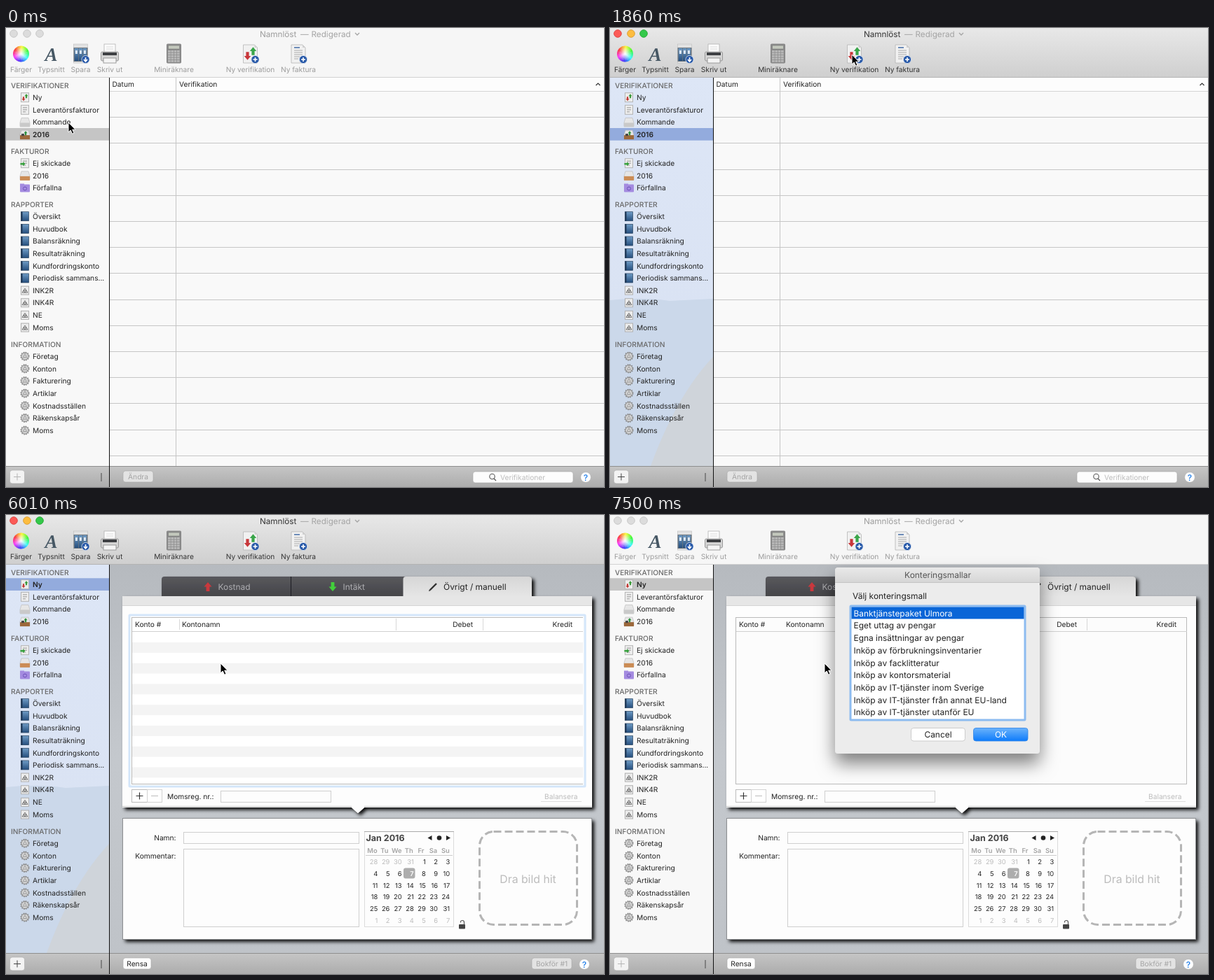
Recreate the animation shown at these times as an HTML page. Size 853 by 656 pixels, loop 8 s.

```html
<!DOCTYPE html>
<html lang="sv">
<head>
<meta charset="utf-8">
<title>Bokföring</title>
<style>
html, body { margin: 0; width: 100%; height: 100%; overflow: hidden; background: #f6f6f6 }
svg { display: block; width: 853px; height: 656px }
text { font: 10.2px Inter, "Open Sans", sans-serif; text-rendering: geometricPrecision; fill: #222; white-space: pre }
.big { font-size: 11.95px }
.title { font-size: 11.7px }
.head { font-weight: 500; fill: #686868 }
.chrome { fill: #9c9c9c }
.on .chrome { fill: #333 }
.dim { fill: #a4a4a4 }
.pale { fill: #bcbcbc }
.bar { fill: #f6f6f6 }
.on .bar { fill: url(#bar) }
.edge { fill: #d2d2d2 }
.on .edge { fill: #b3b3b3 }
.light { fill: #dcdcdc; stroke: #c8c8c8 }
.on .light { fill: var(--c); stroke: var(--s) }
.sel { fill: #c5c5c5 }
.on .sel { fill: #93abdd }
.year, .form .new { font-weight: 600 }
.form .year { font-weight: 400 }
.tint, .panel, .focus, .dialog { display: none }
.on .tint, .form .panel, .ring .focus, .ask .dialog { display: inline }
.form .list { display: none }
.plus { stroke: #b5b5b5 }
.on .plus { stroke: #444 }
</style>
</head>
<body>
<script>
const rect = (x, y, w, h, fill, more = '') =>
  `<rect x="${x}" y="${y}" width="${w}" height="${h}" fill="${fill}" ${more}/>`;
const box = (x, y, w, h, fill, stroke, r = 0) => rect(x, y, w, h, fill, `stroke="${stroke}" rx="${r}"`);
const path = (d, fill, more = '') => `<path d="${d}" fill="${fill}" ${more}/>`;
const line = (d, color, w = 1, more = '') => path(d, 'none', `stroke="${color}" stroke-width="${w}" ${more}`);
const dot = (x, y, r, fill, more = '') => `<circle cx="${x}" cy="${y}" r="${r}" fill="${fill}" ${more}/>`;
const text = (x, y, s, cls = '', more = '') => `<text x="${x}" y="${y}" class="${cls}" ${more}>${s}</text>`;
const mid = 'text-anchor="middle"', end = 'text-anchor="end"';
const at = (x, y, body, s = 1) => `<g transform="translate(${x} ${y}) scale(${s})">${body}</g>`;
const group = (cls, body) => `<g class="${cls}">${body}</g>`;
const each = (n, f) => Array.from({ length: n }, (_, i) => f(i)).join('');
const fade = (id, ...stops) => `<linearGradient id="${id}" x2="0" y2="1">` +
  stops.map((c, i) => `<stop offset="${i / (stops.length - 1)}" stop-color="${c}"/>`).join('') + '</linearGradient>';
const shadow = (id, dx, dy, blur, a) => `<filter id="${id}" x="-20%" y="-30%" width="140%" height="160%">` +
  `<feDropShadow dx="${dx}" dy="${dy}" stdDeviation="${blur}" flood-opacity="${a}"/></filter>`;

const defs = `<defs>${fade('bar', '#e8e8e8', '#cfcfcf')}${fade('foot', '#c6c6c6', '#acacac')}
${fade('desk', '#b6babf', '#c4c8cd', '#bfc3c8')}${fade('side', '#dde6f6', '#d8e1f2')}${fade('tab', '#58585c', '#454549')}
${fade('strip', '#d6d6d6', '#e6e6e6')}${fade('ok', '#6bb3fb', '#0d7bfb')}${fade('book', '#6f9cc6', '#254e7d')}
${fade('cap', '#e9e9e9', '#d6d6d6')}${shadow('lift', 3.5, 3.5, 2.5, .95)}${shadow('float', 0, 14, 13, .5)}
<radialGradient id="glow"><stop stop-color="#fff"/><stop offset="1" stop-color="#fff" stop-opacity="0"/></radialGradient></defs>`;

// Small icons, drawn around their own centre
const arrow = (color, turn = 0) =>
  path('M0-6L5 0H2.2V6H-2.2V0H-5Z', color, `transform="rotate(${turn})"`);
const sheet = box(-5.5, -6.5, 11, 13, '#ededed', '#b4b4b4');
const lines = line('M-3-3H3M-3 0H3M-3 3H1', '#999');
const tray = c => path('M-5-6H5L7 1V6H-7V1Z', '#e6e6e6', 'stroke="#b5b5b5" stroke-width=".6"') + rect(-7, 1, 14, 6, c);
const icons = {
  both: sheet + at(-2, 2, arrow('#c33b36', 180), .5) + at(2, -2, arrow('#3a9a3a'), .5),
  bill: sheet + lines,
  grey: tray('#c9c9c9'),
  done: tray('#9c683b') + at(1, -2, arrow('#2e8f3d'), .5) + rect(-5, -1, 4, 3, '#444'),
  send: sheet + lines + at(-3, 1, arrow('#39a23f', 90), .6),
  brown: tray('#cb8c55'),
  late: rect(-7, -5, 14, 11, '#a48be0', 'rx="1"') + rect(-7, -6, 6, 3, '#a48be0') + dot(0, 1, 2.5, 'none', 'stroke="#6d52b8"'),
  book: rect(-5.5, -6.5, 11, 13, 'url(#book)', 'stroke="#28435f" stroke-width=".7"') + rect(-5.5, -6.5, 2, 13, '#1e3654'),
  form: box(-5.5, -6, 11, 12, '#ececec', '#b0b0b0') + line('M0-3L-4 3H4ZM-2 0H2L0 3Z', '#666', .9),
  gear: dot(0, 0, 5.2, '#cfcfcf', 'stroke="#8d8d8d"') + dot(0, 0, 5.9, 'none', 'stroke="#858585" stroke-width="1.3" stroke-dasharray="1.5 1.6"') +
    dot(0, 0, 1.6, '#eee', 'stroke="#888" stroke-width=".8"') + line('M0-5V-2M-4 3L-1 1M4 3L1 1', '#909090', .8),
};
const badge = mark => dot(0, 0, 5.6, '#2859a8', 'stroke="#dbe4f2" stroke-width=".8"') + line(mark, '#fff', 1.6);
const plus = 'M-3 0H3M0-3V3';
const paper = path('M-10-13H6L10-9V13H-10Z', '#f1f1f1', 'stroke="#b4b4b4" stroke-width=".8"') + path('M6-13V-9H10Z', '#d0d0d0');

const wheel = each(36, i => {
  const p = a => `${(11.5 * Math.sin(a)).toFixed(2)} ${(-11.5 * Math.cos(a)).toFixed(2)}`, a = i * Math.PI / 18;
  return path(`M0 0L${p(a)}L${p(a + .2)}Z`, `hsl(${60 + i * 10} 95% 60%)`);
}) + dot(0, 0, 10, 'url(#glow)');
const rack = rect(-10, -14, 20, 27, '#e2e2e2', 'stroke="#bdbdbd" stroke-width=".6"') + rect(-10, -9, 20, 20, '#6a747e') +
  each(3, i => rect(-8.7 + i * 6, -8, 5.2, 18, 'url(#book)') + rect(-7.6 + i * 6, -5, 3, 5, '#dfe8f1')) + at(7, 8, badge('M0-3V3M-2.5 0L0 3L2.5 0'));
const printer = rect(-8, -14, 16, 14, '#fbfbfb', 'stroke="#aaa" stroke-width=".7"') + line('M-5-10H5M-5-7H5', '#ddd') +
  rect(-12.5, -3, 25, 13, '#d4d4d4', 'rx="2" stroke="#888" stroke-width=".8"') + rect(-10, -2, 20, 4, '#3e4043') +
  rect(-9, 6, 18, 7, '#f4f4f4', 'stroke="#888" stroke-width=".8"');
const calc = rect(-10, -14, 20, 27, '#8c8c8c', 'rx="1" stroke="#858585"') + rect(-8, -12, 16, 5, '#c3c8bd', 'stroke="#777" stroke-width=".6"') +
  each(20, i => rect(-8.4 + i % 4 * 4.3, -5 + (i >> 2) * 3.5, 3.6, 2.7, '#b9b9b9'));
const tools = [
  [21.5, 'Färger', wheel],
  [64.5, 'Typsnitt', `<text y="10" text-anchor="middle" style="font:italic bold 27px 'Liberation Serif',serif;fill:#465764">A</text>`],
  [106.5, 'Spara', rack],
  [148, 'Skriv ut', printer],
  [239.5, 'Miniräknare', calc],
  [348.5, 'Ny verifikation', paper + at(-4, 3, arrow('#c8373a', 180), .95) + at(4, -4, arrow('#3aa64a'), .95) + at(7, 8, badge(plus))],
  [417, 'Ny faktura', paper + line('M-6-9H2', '#6d8cb8', 2) + line('M-6-5H6M-6-2H6M-6 1H6M-6 4H2M-6 7H0', '#aaa') + at(7, 8, badge(plus))],
];

const menu = [
  [82, 'VERIFIKATIONER', 'both:Ny:new bill:Leverantörsfakturor grey:Kommande done:2016:year'],
  [176, 'FAKTUROR', 'send:Ej_skickade brown:2016 late:Förfallna'],
  [252, 'RAPPORTER', 'book:Översikt book:Huvudbok book:Balansräkning book:Resultaträkning book:Kundfordringskonto ' +
    'book:Periodisk_sammans... form:INK2R form:INK4R form:NE form:Moms'],
  [452, 'INFORMATION', 'gear:Företag gear:Konton gear:Fakturering gear:Artiklar gear:Kostnadsställen gear:Räkenskapsår gear:Moms'],
].map(([y, title, items]) => text(7, y + 4, title, 'head') + items.split(' ').map((item, i) => {
  const [icon, name, cls] = item.split(':'), cy = y + 17.2 + i * 17.65;
  return at(27, cy, icons[icon]) + text(38, cy + 3.7, name.replace('_', ' '), cls);
}).join('')).join('');

const lights = [['#fc5b57', '#df4744', 11], ['#fdbd3f', '#de9f34', 30], ['#34c84a', '#27aa35', 48]]
  .map(([c, s, x]) => dot(x, 8, 5.3, '', `class="light" style="--c:${c};--s:${s}"`)).join('');

const frame = rect(0, 0, 853, 70, '', 'class="bar"') + lights +
  text(362, 12.7, 'Namnlöst', 'title chrome') + text(420, 12.7, '—', 'title dim') + text(435.5, 12.7, 'Redigerad', 'title dim') +
  line('M498 7L501 10L504 7', '#a4a4a4', 1.3) +
  tools.map(([x, name, icon]) => at(x, 37, icon) + text(x, 63, name, 'chrome', mid)).join('') +
  rect(0, 70, 853, 1, '', 'class="edge"');

const side = rect(0, 71, 147, 555, '#f8f8f8') +
  group('tint', rect(0, 71, 147, 555, 'url(#side)') + path('M0 389Q45 384 85 390L147 387V626H0Z', '#cbd8ea') +
    path('M147 470Q95 525 58 626H147Z', '#cfd4da')) +
  rect(0, 0, 147, 17.7, '', 'class="sel" id="sel"') + menu;

const button = (x, w, name, cls) => rect(x, 633, w, 16, cls ? '#e3e3e3' : '#fdfdfd', 'rx="3.5" stroke="#a6a6a6" stroke-width=".6"') +
  text(x + w / 2, 644.8, name, cls, mid);
const help = x => dot(x, 642, 7.3, '#fff', 'stroke="#aaa" stroke-width=".5"') +
  text(x, 646.5, '?', '', mid + ' style="font-size:12px;font-weight:500;fill:#1c7be8"');
const foot = rect(0, 626, 853, 30, 'url(#foot)') + rect(0, 626, 853, 1, '#8e8e8e') +
  rect(5.5, 632, 21, 19, '#f3f3f3', 'rx="3.5" stroke="#aaa" stroke-width=".6"') +
  `<path d="M11 641.5H21M16 636.5V646.5" class="plus"/>` + rect(135, 636, 2, 12, '#808080');

const table = group('list', rect(148, 71, 705, 555, '#f9f9f9') + rect(148, 71, 705, 19, '#fdfdfd') +
  each(15, i => rect(148, Math.round(90 + i * 37.2), 705, 1, i ? '#c6c6c6' : '#d4d4d4')) + rect(242, 71, 1, 555, '#c6c6c6') +
  text(151.5, 83.5, 'Datum') + text(247, 83.5, 'Verifikation') + line('M841.5 82L844.5 79L847.5 82', '#333', 1.2) +
  button(167, 43, 'Ändra', 'dim') + rect(666, 634, 143, 16, '#fdfdfd', 'rx="3.5" stroke="#a6a6a6" stroke-width=".6"') +
  dot(693.5, 641, 3.7, 'none', 'stroke="#555" stroke-width="1.1"') + line('M696 644L699 647', '#555', 1.2) +
  text(705, 645.6, 'Verifikationer', 'pale') + help(827));

const field = (x, y, w, h) => box(x + .5, y + .5, w, h, '#fdfdfd', '#cfcfcf');
const tabs = path('M222 117V92Q222 88 226 88H746Q750 88 750 92V117Z', 'url(#tab)') + rect(406, 88, 1, 28, '#1f1f21') +
  path('M566.5 117V92Q566.5 88 570.5 88H746Q750 88 750 92V117Z', 'url(#strip)') +
  at(288, 102.5, arrow('#c9383c'), 1.1) + text(302.5, 107, 'Kostnad', 'big', 'style="fill:#aeaeb2"') +
  at(466, 102.5, arrow('#43cf3b', 180), 1.1) + text(480.5, 107, 'Intäkt', 'big', 'style="fill:#aeaeb2"') +
  line('M605 107L614 98', '#333', 2.4) + path('M603 109L604 106L606 108Z', '#333') + text(624, 107, 'Övrigt / manuell', 'big');

const rows = rect(180, 147, 643, 237, '#fff') +
  each(7, i => rect(180, 182 + i * 29.75, 643, 14.9, '#f4f4f4')) + rect(247, 149, 1, 15, '#d8d8d8');
const ledger = box(179.5, 146.5, 643, 238, '#fcfcfc', '#bababa') +
  group('focus', rows + rect(178.5, 145.5, 645, 240, 'none', 'id="ring" stroke="#90c0f5" stroke-width="3" rx="1"')) +
  rect(180, 166, 643, 1, '#d0d0d0') + rect(556, 148, 1, 17, '#d8d8d8') + rect(680, 148, 1, 17, '#d8d8d8') +
  text(184, 160, 'Konto #') + text(251, 160, 'Kontonamn') + text(666, 160, 'Debet', '', end) + text(808, 160, 'Kredit', '', end) +
  box(179.5, 392.5, 22, 18, '#fff', '#bcbcbc') + box(201.5, 392.5, 21, 18, '#fff', '#d2d2d2') +
  line('M185.5 401.5H195.5M190.5 396.5V406.5', '#333', 1.2) + line('M207 401.5H217', '#bbb') +
  text(230, 405.5, 'Momsreg. nr.:') + field(306, 394, 157, 16) + text(815.5, 405.5, 'Balansera', 'pale', end) +
  rect(763, 409, 58, 1, '#dedede');

const calendar = box(511.5, 452.5, 127, 136, '#fdfdfd', '#dcdcdc') + rect(511, 452, 128, 1, '#aaa') + rect(513, 486, 124, 1, '#ccc') +
  text(513.5, 465.5, 'Jan 2016', '', 'style="font-size:12.5px;font-weight:700;fill:#444"') +
  path('M601.5 461.5L607.5 458V465ZM634 461.5L628 458V465Z', '#222') + dot(618, 461.5, 3.3, '#222') +
  ['Mo', 'Tu', 'We', 'Th', 'Fr', 'Sa', 'Su'].map((d, i) =>
    text(522.5 + i * 17.4, 482.5, d, 'dim', mid + ' style="font-size:9.4px;font-weight:600"')).join('') +
  rect(567, 504.5, 16.5, 15, '#adadad', 'rx="3"') +
  each(42, i => {
    const d = i - 3, out = d < 1 || d > 31;
    return text(530.3 + i % 7 * 17.15, 499 + Math.floor(i / 7) * 16.8, d < 1 ? d + 31 : d > 31 ? d - 31 : d, out ? 'pale' : '',
      end + ` style="font-size:9.4px${d == 7 ? ';fill:#fff;font-weight:600' : ''}"`);
  });

const form = group('panel', rect(148, 71, 705, 555, 'url(#desk)') +
  `<g filter="url(#lift)">${tabs}${path('M166 116H836V418H511L502 426L493 418H166Z', '#fdfdfd')}</g>` +
  rect(166, 116, 670, 13, '#e6e6e6') + rect(166, 129, 670, 1, '#d4d4d4') +
  rect(166, 416, 670, 1, '#c8c8c8') + path('M493 416H511V418L502 426L493 418Z', '#fdfdfd') + ledger +
  `<g filter="url(#lift)">${rect(166.5, 433.5, 669, 173, '#fdfdfd')}</g>` + box(166.5, 433.5, 669, 173, 'none', '#8d8f92') +
  text(242.5, 465, 'Namn:', '', end) + text(242.5, 490.5, 'Kommentar:', '', end) + field(253, 453, 250, 16) + field(253, 477, 250, 111) +
  calendar + rect(646, 585, 9, 6.5, '#444', 'rx="1"') + line('M648.5 582.5V581.5Q648.5 579.5 651 579.5T653.5 582V585', '#555', 1.2) +
  rect(675.5, 452.5, 139, 133, 'none', 'rx="20" stroke="#b5b5b5" stroke-width="3" stroke-dasharray="11 5"') +
  text(744.5, 525.5, 'Dra bild hit', 'pale', mid + ' style="font-size:15.8px"') +
  button(167, 40, 'Rensa', '') + button(750, 57, 'Bokför #1', 'dim') + help(825));

const choices = ['Banktjänstepaket Ulmora', 'Eget uttag av pengar', 'Egna insättningar av pengar', 'Inköp av förbrukningsinventarier',
  'Inköp av facklitteratur', 'Inköp av kontorsmaterial', 'Inköp av IT-tjänster inom Sverige',
  'Inköp av IT-tjänster från annat EU-land', 'Inköp av IT-tjänster utanför EU'];
const dialog = group('dialog', `<g id="dialog"><g filter="url(#float)">${rect(321, 75, 292, 266, '#ececec', 'rx="4.5"')}</g>` +
  path('M321 96V79.5Q321 75 325.5 75H608.5Q613 75 613 79.5V96Z', 'url(#cap)') + rect(321, 96, 292, 1, '#c4c4c4') +
  text(467.5, 90.2, 'Konteringsmallar', 'big', mid + ' style="fill:#555"') + text(346, 119.7, 'Välj konteringsmall', 'big') +
  rect(343, 130, 249, 163, '#fff', 'stroke="#8dbcf0" stroke-width="3" rx="1"') + rect(344.5, 131.5, 246, 17, '#0965d7') +
  choices.map((s, i) => text(347.5, 144.8 + i * 17.68, s, 'big', i ? '' : 'style="fill:#fff"')).join('') +
  rect(429.5, 304.5, 77, 18.5, '#fff', 'rx="3.5" stroke="#c2c2c2" stroke-width=".8"') + text(468, 318, 'Cancel', 'big', mid) +
  rect(518.5, 304.5, 77.5, 18.5, 'url(#ok)', 'rx="3.5" stroke="#2f83e6" stroke-width=".8"') +
  text(557.5, 318, 'OK', 'big', mid + ' style="fill:#fff"') + '</g>');

const pointer = `<g id="pointer">${path('M0 0V14L3.2 11L5.6 16.3L8 15.2L5.7 10.2H10Z', '#000', 'stroke="#fff" stroke-width="1"')}</g>`;

document.body.innerHTML = `<svg viewBox="0 0 853 656">${defs}${frame}${side}${foot}${table}${form}` +
  rect(147, 71, 1, 585, '#111') + dialog + pointer + '</svg>';

const root = document.querySelector('svg'), $ = id => document.getElementById(id);
const sel = $('sel'), ring = $('ring'), alertBox = $('dialog'), hand = $('pointer');

// Pointer stops: time, x, y
const stops = [[0, 89, 135], [90, 82, 130], [230, 80, 127], [320, 76, 120], [410, 71, 112], [500, 67, 106], [590, 65, 102], [680, 64, 100],
  [950, 82, 99], [1040, 140, 98], [1130, 212, 95], [1220, 300, 66], [1300, 362, 42], [1390, 345, 38],
  [5240, 344, 60], [5390, 343, 85], [5480, 335, 130], [5570, 318, 180], [5660, 306, 212]];

function draw(t) {
  const is = (name, a, b = 8000) => root.classList.toggle(name, t >= a && t < b);
  is('on', 1860, 7230);
  const open = is('form', 2310);
  is('ring', 6010, 7230);
  is('ask', 7350);
  sel.setAttribute('y', open ? 90.3 : 143);

  const grow = t < 6110 ? 2.5 : t < 6210 ? 1.2 : 0;
  ring.setAttribute('x', 178.5 - grow);
  ring.setAttribute('y', 145.5 - grow);
  ring.setAttribute('width', 645 + 2 * grow);
  ring.setAttribute('height', 240 + 2 * grow);
  ring.setAttribute('opacity', 1 - grow / 4);

  const small = t < 7500;
  alertBox.setAttribute('transform', small ? 'translate(467 208) scale(.94) translate(-467 -208)' : '');
  alertBox.setAttribute('opacity', small ? .8 : 1);

  const [, x, y] = stops.findLast(s => s[0] <= t);
  hand.setAttribute('transform', `translate(${x} ${y})`);
}

let start;
function tick(now) {
  start ??= now;
  draw((now - start) % 8000);
  requestAnimationFrame(tick);
}
draw(0);
requestAnimationFrame(tick);
</script>
</body>
</html>
```
